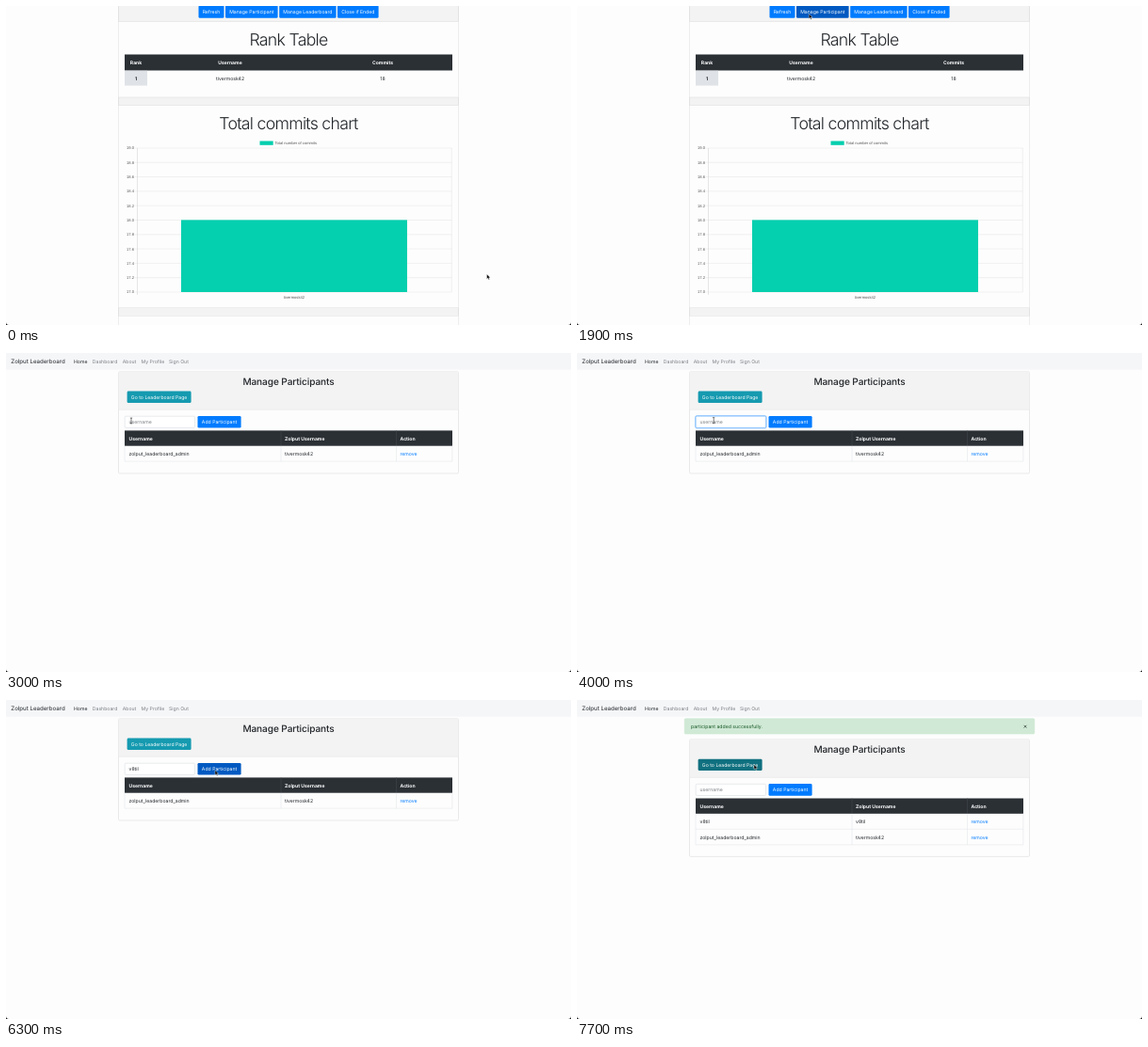
Write an HTML page that moves like this. It is 600 by 339 pixels and loops after 8 s.

```html
<!DOCTYPE html>
<html lang="en">
<head>
<meta charset="utf-8">
<title>Leaderboard admin</title>
<style>
  html, body { margin: 0; width: 100%; height: 100%; overflow: hidden; background: #fdfdfd; }
  svg { display: block; width: 600px; height: 339px; }
  text { font: 400 5.15px Inter, sans-serif; fill: #212529; text-rendering: geometricPrecision; white-space: pre; }
  .mid { text-anchor: middle; }
  .end { text-anchor: end; }
  .bold { font-weight: 700; font-size: 5.05px; }
  .white { fill: #fff; }
  .grey { fill: #7b7f83; }
  .link { fill: #007bff; }
  .brand { font-size: 6.15px; }
  .display { font-size: 17.7px; font-weight: 300; letter-spacing: -.72px; }
  .title { font-size: 10.1px; font-weight: 500; letter-spacing: -.1px; }
  .chart { font: 4.1px "Liberation Sans", Arial, sans-serif; fill: #555; }
  .alert { fill: #155724; }
</style>
</head>
<body>
<svg id="stage" viewBox="0 0 600 339" xmlns="http://www.w3.org/2000/svg"></svg>
<script>
const LOOP = 8000, STEP = 100;
const BLUE = '#007bff', BLUE_DOWN = '#0059c1', TEAL = '#159ab0', TEAL_DOWN = '#10707f';
const DARK = '#2b3035', LINE = '#dee2e6', EDGE = '#dcdcdc', MINT = '#04cfae';
const PLAYER = 'tivermosk42', ADDED = 'v8til', ADMIN = 'zolput_leaderboard_admin';

const rect = (x, y, w, h, fill, extra = '') =>
  `<rect x="${x}" y="${y}" width="${w}" height="${h}" fill="${fill}" ${extra}/>`;
const line = (x1, y1, x2, y2, color = LINE, w = .5) =>
  `<path d="M${x1} ${y1}L${x2} ${y2}" stroke="${color}" stroke-width="${w}"/>`;
const text = (x, y, str, cls = '', id = '') =>
  `<text x="${x}" y="${y}" class="${cls}" ${id && `id="${id}"`}>${str}</text>`;
const group = (id, body, attrs = '') => `<g id="${id}" ${attrs}>${body}</g>`;
const button = (x, y, w, h, label, fill, id = '') =>
  rect(x, y, w, h, fill, `rx="1.3" ${id && `id="${id}"`}`) +
  text(x + w / 2, y + h / 2 + 1.9, label, 'mid white');

function chart() {
  let out = rect(269.5, 143.5, 14.2, 4.3, MINT) +
    text(285.5, 147.1, 'Total number of commits', 'chart');
  for (let i = 0; i <= 10; i++) {
    const y = 151 + i * 15.3;
    out += line(136.5, y, 473.5, y, '#e3e3e3') +
      text(136, y + 1.4, (19 - i * .2).toFixed(1), 'chart end');
  }
  return out + line(139.5, 151, 139.5, 307, '#cfcfcf') + line(473.3, 151, 473.3, 304, '#e3e3e3') +
    rect(186, 227.4, 240, 76.6, MINT) + text(306, 311.2, PLAYER, 'chart mid');
}

function rankPage() {
  const bands = [[-3, 19.5], [97, 8.5], [320.8, 8.4]];
  return bands.map(([y, h]) => rect(119.5, y, 361, h, '#f3f3f3', `stroke="${EDGE}" stroke-width=".5"`)).join('') +
    line(119.5, 0, 119.5, 339, EDGE) + line(480.5, 0, 480.5, 339, EDGE) +
    button(204.5, -.5, 27, 13.2, 'Refresh', BLUE) +
    button(233, -.5, 55.6, 13.2, 'Manage Participant', BLUE, 'manage') +
    button(290.2, -.5, 60.4, 13.2, 'Manage Leaderboard', BLUE) +
    button(352, -.5, 43.6, 13.2, 'Close if Ended', BLUE) +
    text(300, 41.8, 'Rank Table', 'mid display') +
    rect(126, 51.5, 348, 17, DARK) +
    [[138, 'Rank'], [238, 'Username'], [400, 'Commits']].map(([x, s]) => text(x, 61.9, s, 'mid bold white')).join('') +
    rect(126, 68.8, 24, 15.8, '#dfe3e7') + text(138, 78.7, '1', 'mid bold') +
    text(238, 78.6, PLAYER, 'mid') + text(400, 78.6, '18', 'mid') +
    text(300, 130.8, 'Total commits chart', 'mid display') + chart();
}

const navBar = () => rect(0, 0, 600, 17.6, '#f5f6f8') +
  text(5.3, 11, 'Zolput Leaderboard', 'brand') + text(72, 10.8, 'Home') +
  [[91.8, 'Dashboard'], [123.8, 'About'], [143.6, 'My Profile'], [173, 'Sign Out']]
    .map(([x, s]) => text(x, 10.8, s, 'grey')).join('');

const row = (y, user, player) => line(126, y + 16.5, 474, y + 16.5) +
  [126, 292, 414.5, 473.8].map(x => line(x, y, x, y + 16.5)).join('') +
  text(130.5, y + 10.6, user) + text(296, y + 10.6, player) + text(418.5, y + 10.6, 'remove', 'link');

const card = () => rect(119.5, 19.8, 361, 108.2, 'none', `id="frame" rx="1.3" stroke="${EDGE}" stroke-width=".6"`) +
  rect(119.8, 20, 360.4, 40.2, '#f3f3f3') + line(119.5, 60.2, 480.5, 60.2, EDGE) +
  text(300, 34.1, 'Manage Participants', 'mid title') +
  button(128.6, 40.6, 68, 12.4, 'Go to Leaderboard Page', TEAL, 'go') +
  rect(126.2, 67.2, 74.4, 12.2, '#fff', 'id="field" rx="1.2" stroke="#ced4da" stroke-width=".5"') +
  rect(125.6, 66.6, 75.6, 13.4, 'none', 'id="ring" rx="1.7" stroke="#007bff" stroke-opacity=".35" stroke-width="1"') +
  text(130.5, 75.1, '', '', 'value') +
  rect(130.3, 70.2, .5, 6, '#222', 'id="caret"') +
  button(203.5, 67, 46.1, 12.6, 'Add Participant', BLUE, 'add') +
  rect(126, 82.4, 348, 16.3, DARK) + line(292, 82.4, 292, 98.7, '#43494f') + line(414.5, 82.4, 414.5, 98.7, '#43494f') +
  [[130.5, 'Username'], [296, 'Zolput Username'], [418.5, 'Action']].map(([x, s]) => text(x, 92.5, s, 'bold white')).join('') +
  group('newRow', row(98.7, ADDED, ADDED)) + group('adminRow', row(98.7, ADMIN, PLAYER));

const alertBox = () => rect(114.2, 19.7, 371.6, 16.4, '#d0e9d6', 'rx="1.3" stroke="#c3e6cb" stroke-width=".5"') +
  text(121, 29.8, 'participant added successfully.', 'alert') +
  `<path d="M474.6 26.8l2.8 2.8m0-2.8l-2.8 2.8" stroke="#4a5a4e" stroke-width=".9"/>`;

const cursor = () =>
  group('arrow', '<path d="M0 0V5.2L1.2 4.1 2 6 2.9 5.6 2.1 3.8H3.7Z" fill="#000" stroke="#fff" stroke-width=".4"/>') +
  group('beam', '<path d="M-1.1-3.2Q0-3.2 0-2.4V2.4Q0 3.2-1.1 3.2M1.1-3.2Q0-3.2 0-2.4M0 2.4Q0 3.2 1.1 3.2" fill="none" stroke="#222" stroke-width=".6"/>');

document.getElementById('stage').innerHTML = rect(0, 0, 600, 339, '#fdfdfd') +
  group('rank', rankPage()) +
  group('people', navBar() + group('alert', alertBox()) + group('card', card())) +
  '<path d="M0 336Q0 339 3 339H0ZM600 336Q600 339 597 339H600Z" fill="#000"/>' + cursor();

const $ = id => document.getElementById(id);
const show = (id, on) => $(id).setAttribute('display', on ? 'inline' : 'none');
const fill = (id, color) => $(id).setAttribute('fill', color);
const place = (id, x, y) => $(id).setAttribute('transform', `translate(${x} ${y})`);

// Pointer stops: time, x, y
const PATH = [
  [200, 510.6, 285], [400, 488, 262], [700, 370, 128], [900, 298, 58], [1100, 265, 29.5],
  [1400, 250, 12], [1800, 246.3, 8.3], [2200, 246.3, 8.3], [2400, 232, 18], [2700, 170, 53],
  [3000, 133, 72], [3200, 136, 74], [3400, 144, 73], [3700, 145.2, 71.6], [5200, 145.2, 71.6],
  [5400, 152, 72], [5800, 208, 74], [6100, 221, 75], [6300, 222, 74.6], [6900, 222, 74.6],
  [7100, 320, 100], [7300, 420, 124], [7400, 416, 124], [7600, 212, 73], [7700, 188, 68.6], [LOOP, 188, 68.6]
];
// Typed text: start time, number of characters
const TYPED = [[4100, 1], [4200, 2], [4500, 3], [4700, 4], [4800, 5]];

function pointer(t) {
  const i = PATH.findIndex(p => p[0] > t);
  if (i < 1) return PATH[0].slice(1);
  const [t0, x0, y0] = PATH[i - 1], [t1, x1, y1] = PATH[i];
  const k = (t - t0) / (t1 - t0);
  return [x0 + (x1 - x0) * k, y0 + (y1 - y0) * k];
}

function render(now) {
  const t = Math.floor(now % LOOP / STEP) * STEP;
  const onRank = t < 2000, added = t >= 6500, shift = added ? 22.1 : 0;
  const [x, y] = pointer(t);
  const over = (x0, y0, x1, y1) => x > x0 && x < x1 && y > y0 && y < y1;

  show('rank', onRank);
  show('people', !onRank);
  fill('manage', onRank && over(233, 0, 288, 13) ? BLUE_DOWN : BLUE);

  show('alert', added);
  show('newRow', added);
  place('card', 0, shift);
  place('adminRow', 0, added ? 16.5 : 0);
  $('frame').setAttribute('height', added ? 124.5 : 108.2);
  fill('add', !added && over(203, 67, 250, 80) ? BLUE_DOWN : BLUE);
  fill('go', added && over(128, 62, 197, 76) ? TEAL_DOWN : TEAL);

  const focus = t < 6100 ? Math.min(1, Math.max(0, (t - 3100) / 200)) : 0;
  $('ring').setAttribute('opacity', focus);
  $('field').setAttribute('stroke', focus ? '#59a9fb' : '#ced4da');

  const count = added ? 0 : TYPED.reduce((n, [at, chars]) => t >= at ? chars : n, 0);
  const value = $('value');
  value.textContent = count ? ADDED.slice(0, count) : 'username';
  value.setAttribute('class', count ? '' : 'grey');
  $('caret').setAttribute('x', count ? 130.7 + value.getComputedTextLength() : 130.3);
  show('caret', focus && (t < 3600 || count));

  const typing = t >= 4100 && t < 5300;
  const inField = !onRank && !added && over(126, 67, 201, 80);
  show('arrow', !typing && !inField);
  show('beam', !typing && inField);
  place('arrow', x, y);
  place('beam', x, y);
}

function tick() {
  render(performance.now());
  requestAnimationFrame(tick);
}
tick();
</script>
</body>
</html>
```
